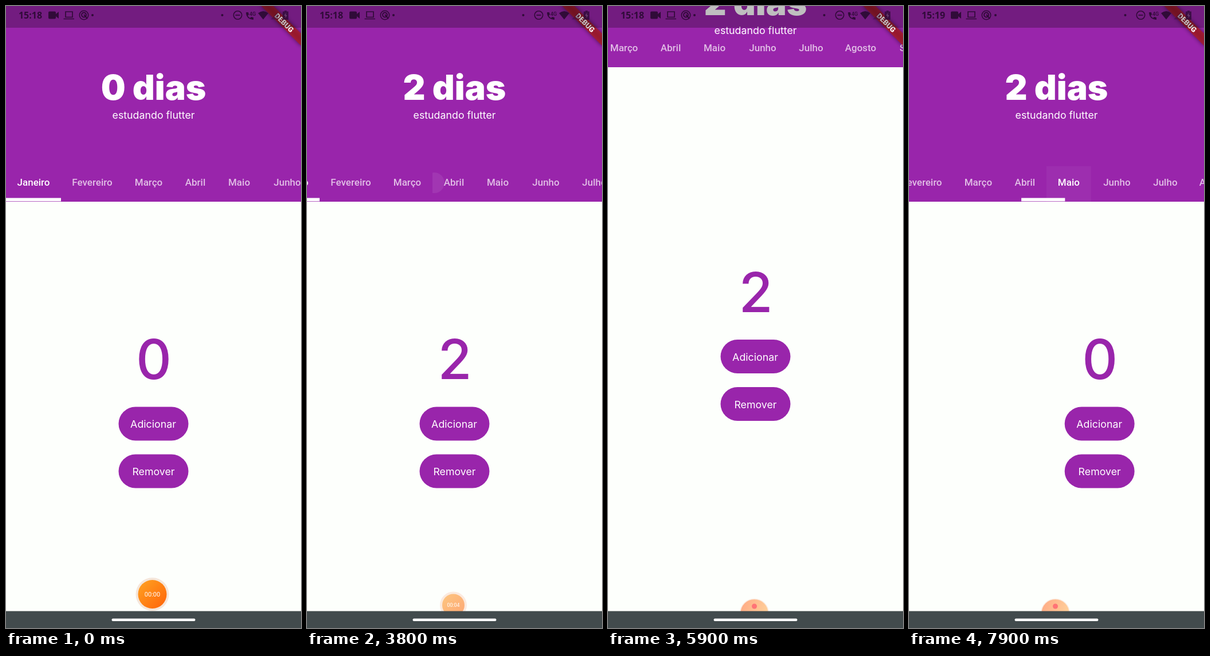
Write an HTML page that moves like this. It is 515 by 1087 pixels and loops after 8000 ms.

```html
<!DOCTYPE html>
<html lang="pt">
<head>
<meta charset="utf-8">
<title>Dias de estudo</title>
<style>
  html, body { margin: 0; width: 100%; height: 100%; overflow: hidden; background: #fdfffc; }
  svg { display: block; width: 515px; height: 1087px; }
  text { text-anchor: middle; }
  .app { font: 400 17.8px Inter, sans-serif; fill: #fff; }
  .title { font: 900 60.500px Inter, sans-serif; }
  .count { font: 500 96px Inter, sans-serif; fill: #9925ab; }
  .tabs { font: 500 17px Roboto, sans-serif; fill: #fff; }
  .clock { font: 700 16px "Open Sans", sans-serif; }
  .timer { font-family: Roboto, sans-serif; fill: #fff; }
</style>
</head>
<body>
<svg viewBox="0 0 515 1087">
  <defs>
    <linearGradient id="bright" x2="1" y2="1">
      <stop offset=".1" stop-color="#ff9d20"/><stop offset=".9" stop-color="#ff690b"/>
    </linearGradient>
    <linearGradient id="pale" x2="1" y2=".4">
      <stop offset="0" stop-color="#ffa984"/><stop offset="1" stop-color="#ffd09a"/>
    </linearGradient>
    <clipPath id="pillClip"><rect x="196.500" y="700.500" width="122" height="59" rx="29.500"/></clipPath>
    <clipPath id="aprilClip"><rect x="293" y="280" width="75" height="62"/></clipPath>
    <clipPath id="mayClip"><rect x="368" y="280" width="78" height="62"/></clipPath>
    <filter id="blur" x="-30%" y="-100%" width="160%" height="300%"><feGaussianBlur stdDeviation="3.5"/></filter>
    <g id="buttons" class="app">
      <rect x="196.500" y="700.500" width="122" height="59" rx="29.500" fill="#9925ab"/>
      <rect x="196.500" y="783.500" width="122" height="59" rx="29.500" fill="#9925ab"/>
      <text x="257" y="737">Adicionar</text>
      <text x="257.500" y="820">Remover</text>
    </g>
  </defs>
  <rect width="515" height="1087" fill="#fdfffc"/>

  <g id="page">
    <text id="count" class="count" x="258" y="652"></text>
    <use href="#buttons"/>
    <g clip-path="url(#pillClip)"><circle id="tapRipple" cx="257" cy="730" fill="#fff"/></g>
  </g>
  <g id="nextPage">
    <text class="count" x="258" y="652">0</text>
    <use href="#buttons"/>
  </g>

  <rect id="header" width="515" height="342" fill="#9925ab"/>
  <g id="heading" class="app">
    <text id="title" class="title" x="257.500" y="164"></text>
    <text x="257.500" y="197">estudando flutter</text>
  </g>
  <g id="tabBar" class="tabs">
    <g id="tabs">
      <g clip-path="url(#aprilClip)"><circle id="dragRipple" cx="296" cy="309" fill="#fff"/></g>
      <rect id="mayGlow" x="368" y="280" width="78" height="62" fill="#fff"/>
      <g clip-path="url(#mayClip)"><circle id="mayRipple" cx="407" cy="311" fill="#fff"/></g>
      <rect id="indicator" y="335.500" height="5.800" fill="#fff"/>
    </g>
  </g>

  <g transform="translate(515) rotate(45)">
    <rect x="-50" y="34" width="100" height="15" filter="url(#blur)" opacity=".5"/>
    <rect x="-50" y="34" width="100" height="15" fill="#b71c1c" fill-opacity=".7"/>
    <text y="46" fill="#fff" style="font:900 12.750px Roboto,sans-serif">DEBUG</text>
  </g>
  <rect width="515" height="38" opacity=".25"/>
  <g fill="#300b38" stroke="#300b38" stroke-width="0">
    <text id="clock" class="clock" x="42.500" y="22"></text>
    <g id="leftIcons">
      <path d="M76 9.500h9q2 0 2 2v2.500l5-4v12l-5-4v2.500q0 2-2 2h-9q-2 0-2-2v-9q0-2 2-2z"/>
      <path d="M104 19.500v-9.500h12v9.500zM100.500 22.500h18.500" fill="none" stroke-width="1.700"/>
      <circle cx="136" cy="16" r="7.700" fill="none" stroke-width="1.600"/>
      <circle cx="136" cy="15.500" r="3.900" fill="none" stroke-width="2"/>
      <path d="M136 15l6 7" stroke-width="2"/>
    </g>
    <circle cx="151" cy="16" r="2"/>
    <circle cx="377.500" cy="16" r="2"/>
    <circle cx="404.500" cy="16" r="7.200" fill="none" stroke-width="1.600"/>
    <path d="M400.500 16h8" stroke-width="1.700"/>
    <path d="M419 11q0 12 13 13v-4l-4-1-2 2q-3-2-4-4l2-2-1-4z"/>
    <text x="430.500" y="17" style="font:500 9px Roboto,sans-serif">4G</text>
    <path d="M440 12.500q9-7 18 0l-9 11z"/>
    <path d="M462 23.500l13-13v13z" opacity=".35"/>
    <path d="M486 8h4v1.500h3v14.500h-10v-14.500h3z" opacity=".8"/>
    <path d="M488.500 12l-3 5h2.200v4l3-5h-2.200z" fill="#68406d"/>
  </g>

  <g id="dock">
    <circle id="halo" cx="255.500"/>
    <circle id="core" cx="255.500"/>
    <text id="timer" class="timer" x="255.500"></text>
    <circle id="dot" cx="255.500" cy="1049" r="4.500" fill="#ff7476"/>
  </g>
  <rect y="1057.500" width="515" height="30" fill="#424b4d"/>
  <rect x="184.500" y="1070.500" width="146" height="4.500" rx="2.250" fill="#fff"/>
</svg>
<script>
const LOOP = 8000, STEP = 100;
const MONTHS = ['Janeiro', 'Fevereiro', 'Março', 'Abril', 'Maio', 'Junho', 'Julho', 'Agosto', 'Setembro'];
const EDGES = [0, 96, 205, 293, 368, 446, 536, 615, 709, 825];
const $ = id => document.getElementById(id);
const set = (id, attrs) => { for (const k in attrs) $(id).setAttribute(k, attrs[k]); };
const move = (id, x, y) => set(id, { transform: `translate(${x} ${y})` });
const mix = (a, b, p) => a + (b - a) * p;

const labels = MONTHS.map((name, i) => {
  const label = document.createElementNS('http://www.w3.org/2000/svg', 'text');
  label.textContent = name;
  label.setAttribute('x', (EDGES[i] + EDGES[i + 1]) / 2);
  label.setAttribute('y', 314);
  return $('tabs').appendChild(label);
});

// Piecewise-linear value through [time, value] points
function track(points, t) {
  if (t <= points[0][0]) return points[0][1];
  for (let i = 1; i < points.length; i++) {
    const [t0, a] = points[i - 1], [t1, b] = points[i];
    if (t <= t1) return mix(a, b, (t - t0) / (t1 - t0));
  }
  return points[points.length - 1][1];
}

const TAB_SCROLL = [[3600, 0], [3800, 74], [4000, 142], [4200, 194], [4400, 221], [6000, 221], [6200, 100], [6400, 0]];
const COLLAPSE = [[5100, 0], [5300, 94], [5500, 168], [5700, 214], [5900, 235], [6000, 242],
                  [6300, 242], [6400, 217], [6500, 175], [6700, 70], [6900, 0]];
const SWITCH = [[7700, 0], [7800, .53], [7900, .854], [8000, 1]];

function ripple(id, t, start, length, from, to) {
  const p = (t - start) / length, on = p >= 0 && p < 1;
  set(id, { r: on ? mix(from, to, p) : 0, opacity: on ? .08 * Math.min(1, 2 * (1 - p)) : 0 });
}

function drawDock(t) {
  const timed = t < 5500, shrink = track([[1400, 0], [1700, 1]], t);
  const y = timed ? mix(1028, 1047, shrink) : 1061;
  const r = timed ? mix(25, 19.5, shrink) : 24;
  set('halo', { cy: y, r: r + (timed ? 4 : 1.5), fill: shrink < 1 ? '#f5e6da' : '#fbeadf' });
  set('core', { cy: y, r, fill: timed ? 'url(#bright)' : 'url(#pale)', opacity: timed ? mix(1, .5, shrink) : 1 });
  set('timer', { y: y + mix(4, 3, shrink), 'font-size': mix(11, 8.8, shrink), opacity: timed ? 1 : 0 });
  set('dot', { opacity: timed ? 0 : 1 });
  $('timer').textContent = '00:0' + Math.floor((t + 500) / 1000);
}

function render(t) {
  const days = t < 1700 ? 0 : t < 2500 ? 1 : 2;
  const collapse = track(COLLAPSE, t), change = track(SWITCH, t);
  $('count').textContent = days;
  $('title').textContent = days + ' dias';
  $('clock').textContent = t < 7400 ? '15:18' : '15:19';
  move('leftIcons', t < 7400 ? 0 : -1, 0);

  move('page', -515 * change, -collapse / 2);
  move('nextPage', 515 * (1 - change), -collapse / 2);
  set('nextPage', { visibility: change ? 'visible' : 'hidden' });
  set('header', { height: 342 - collapse });
  move('heading', 0, -collapse / 2 - Math.max(0, collapse - 174) / 2);
  move('tabBar', 0, -collapse);
  move('tabs', -track(TAB_SCROLL, t) - 150 * change, 0);

  // The indicator passes over each tab on its way to Maio
  const place = 4 * change, i = Math.floor(place), left = mix(EDGES[i], EDGES[i + 1], place - i);
  set('indicator', { x: left, width: mix(EDGES[i + 1], EDGES[i + 2], place - i) - left });
  labels.forEach((label, n) => {
    label.setAttribute('fill-opacity', n === (change ? 4 : 0) ? 1 : .7);
  });

  if (t < 2300) ripple('tapRipple', t, 1600, 600, 10, 75);
  else ripple('tapRipple', t, 2400, 400, 10, 75);
  ripple('dragRipple', t, 3600, 500, 12, 27);
  ripple('mayRipple', t, 7600, 300, 10, 50);
  set('mayGlow', { opacity: t >= 7600 ? .045 : 0 });
  drawDock(t);
}

const start = performance.now();
function frame() {
  const elapsed = (performance.now() - start) % LOOP;
  render(Math.floor(elapsed / STEP) * STEP);
  requestAnimationFrame(frame);
}
frame();
</script>
</body>
</html>
```
